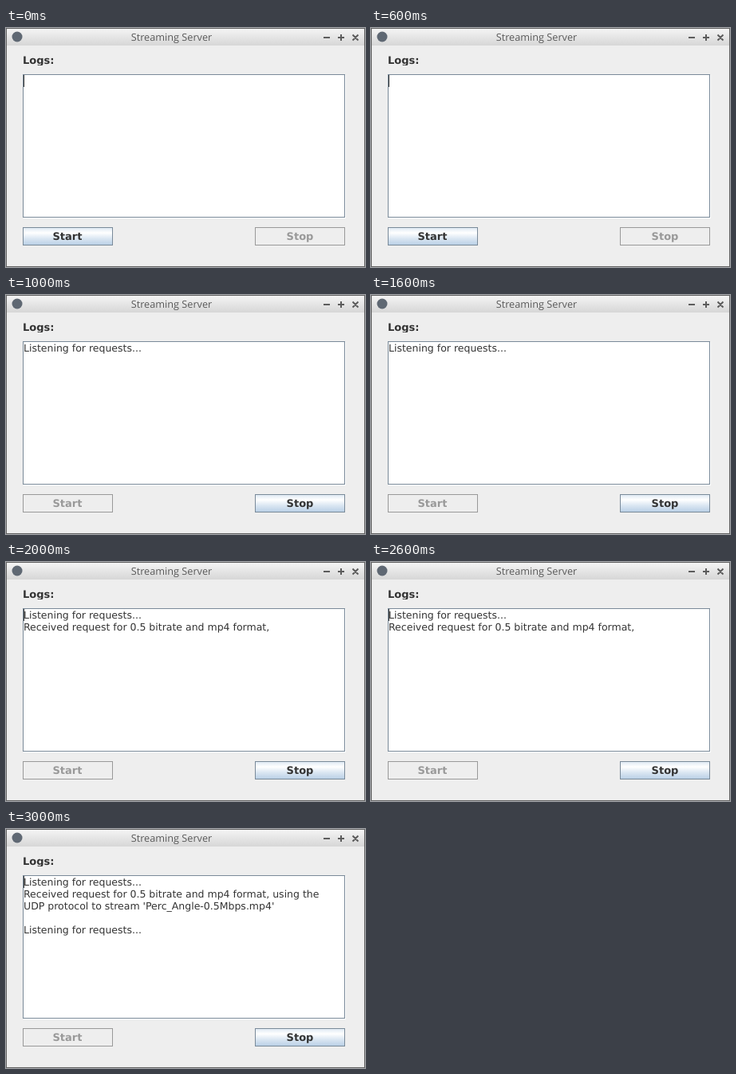
An HTML page that plays this animation: 450x300 px, repeating every 4 s.

```html
<!DOCTYPE html>
<html lang="en">
<head>
<meta charset="utf-8">
<title>Streaming Server</title>
<style>
  html, body { margin: 0; width: 100%; height: 100%; overflow: hidden; background: #eee; }
  svg { display: block; width: 450px; height: 300px; }
  text { white-space: pre; text-rendering: geometricPrecision; }
  .title { font: 500 12.7px "Open Sans", "Noto Sans", sans-serif; fill: #5a5a5a; text-anchor: middle; }
  .label { font: bold 13px "DejaVu Sans", sans-serif; fill: #333; }
  .log { font: 12.5px "DejaVu Sans", sans-serif; fill: #333; }
  .button text { text-anchor: middle; }
  .button rect { fill: url(#ocean); stroke: #7a8a99; }
  .button.off rect { fill: #eee; stroke: #999; }
  .button.off text { fill: #999; }
  .edge { fill: none; stroke: #7a8a99; }
  .controls { fill: none; stroke: #5c5c5c; stroke-width: 2; }
</style>
</head>
<body>
<svg viewBox="0 0 450 300">
  <defs>
    <linearGradient id="bar" x2="0" y2="1">
      <stop offset="0" stop-color="#f6f6f6"/>
      <stop offset="1" stop-color="#d6d6d6"/>
    </linearGradient>
    <linearGradient id="ocean" x2="0" y2="1">
      <stop offset="0" stop-color="#dde8f3"/>
      <stop offset=".3" stop-color="#fff"/>
      <stop offset=".6" stop-color="#dde8f3"/>
      <stop offset="1" stop-color="#b8cfe5"/>
    </linearGradient>
    <clipPath id="labelBox"><rect x="21" y="32" width="60" height="15"/></clipPath>
  </defs>

  <rect width="450" height="300" fill="#eee"/>
  <rect width="450" height="22" fill="url(#bar)"/>
  <rect x=".5" y=".5" width="449" height="299" fill="none" stroke="#646464"/>
  <circle cx="14" cy="11" r="6.5" fill="#5f6873"/>
  <text class="title" x="207.5" y="16">Streaming Server</text>
  <path class="controls" d="M398 12h8M416 12h8M420 8v8M434.5 8.5l7 7M441.5 8.5l-7 7"/>

  <text class="label" x="21" y="45" clip-path="url(#labelBox)">Logs:</text>

  <rect x="22" y="59" width="404" height="180" fill="#fff"/>
  <rect class="edge" x="21.5" y="58.5" width="403" height="179"/>
  <g id="lines"></g>
  <rect id="caret" x="22" y="59" width="1" height="15" fill="#333"/>

  <g class="button" id="start">
    <rect x="21.5" y="250.5" width="112" height="22"/>
    <text class="label" x="77" y="266">Start</text>
  </g>
  <g class="button" id="stop">
    <rect x="312.5" y="250.5" width="112" height="22"/>
    <text class="label" x="368.5" y="266">Stop</text>
  </g>
</svg>
<script>
  const STEP = 1000;
  const wait = "Listening for requests...";
  const request = "Received request for 0.5 bitrate and mp4 format,";
  const steps = [
    { running: false, caret: true, log: [] },
    { running: true, caret: false, log: [wait] },
    { running: true, caret: true, log: [wait, request] },
    { running: true, caret: true, log: [
      wait, request + " using the",
      "UDP protocol to stream 'Perc_Angle-0.5Mbps.mp4'", "", wait
    ] }
  ];

  const byId = id => document.getElementById(id);
  const lines = byId("lines"), caret = byId("caret");
  const start = byId("start"), stop = byId("stop");

  const rows = Array.from({ length: 5 }, (_, i) => {
    const row = document.createElementNS("http://www.w3.org/2000/svg", "text");
    row.setAttribute("class", "log");
    row.setAttribute("x", 22);
    row.setAttribute("y", 71 + 15 * i);
    return lines.appendChild(row);
  });

  function show({ running, caret: on, log }) {
    rows.forEach((row, i) => { row.textContent = log[i] || ""; });
    caret.style.visibility = on ? "visible" : "hidden";
    start.classList.toggle("off", running);
    stop.classList.toggle("off", !running);
  }

  const origin = performance.now();
  let current = -1;
  function tick() {
    const time = Math.max(0, performance.now() - origin);
    const next = Math.floor(time / STEP) % steps.length;
    if (next !== current) show(steps[current = next]);
    requestAnimationFrame(tick);
  }
  tick();
</script>
</body>
</html>
```
